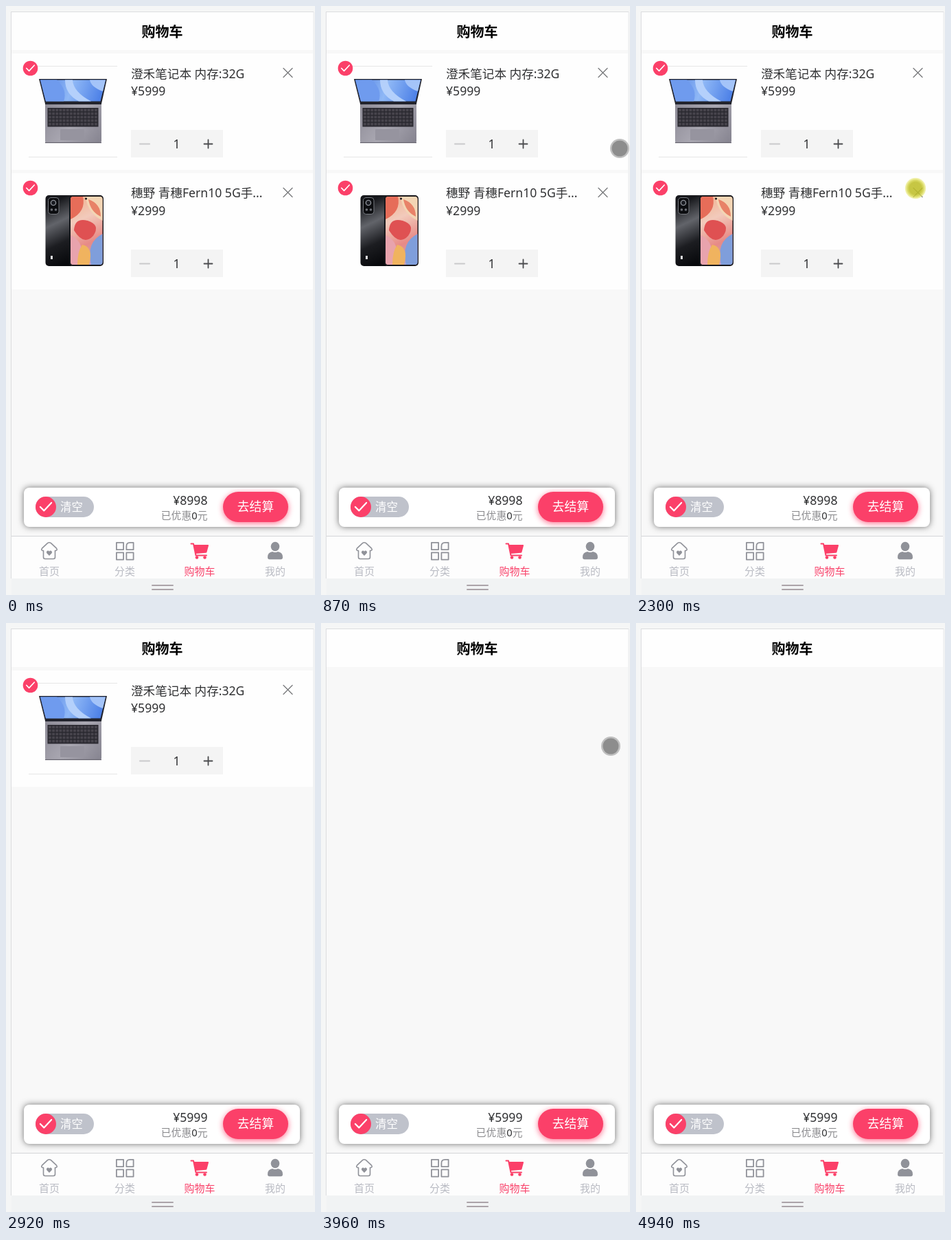
Animation of 450 by 856 pixels, one loop 5270 ms. Source, as an HTML page with a canvas:

```html
<!DOCTYPE html>
<html lang="zh-CN">
<head>
<meta charset="utf-8">
<title>购物车</title>
<style>
html, body { margin: 0; width: 100%; height: 100%; overflow: hidden; background: #f5f6f6; }
canvas, svg { position: absolute; left: 0; top: 0; width: 450px; height: 856px; }
text { font: 17.6px "Noto Sans", "Noto Sans CJK SC", "Noto Sans CJK", sans-serif; fill: #303133; }
.head { font-size: 20px; font-weight: bold; fill: #000; }
.mid { text-anchor: middle; }
.end { text-anchor: end; }
.white { fill: #fff; }
.small { font-size: 14.8px; fill: #8c8c8f; }
.tab { font-size: 15px; fill: #b9bbc3; text-anchor: middle; }
.on { fill: #f9436b; }
</style>
</head>
<body>
<canvas id="stage" width="450" height="856"></canvas>
<svg viewBox="0 0 450 856">
  <text class="head mid" x="227.5" y="44.5">购物车</text>
  <g id="laptop">
    <text x="182" y="104.5">澄禾笔记本 内存:32G</text>
    <text x="182" y="129.5">¥5999</text>
    <text class="mid" x="248.5" y="206.5">1</text>
  </g>
  <g id="phone">
    <text x="182" y="278">穗野 青穗Fern10 5G手...</text>
    <text x="182" y="303.5">¥2999</text>
    <text class="mid" x="248.5" y="380.5">1</text>
  </g>
  <text class="white" x="79" y="734.3" style="font-size:16.5px">清空</text>
  <text id="total" class="end" x="293.5" y="724.5">¥8998</text>
  <text class="small end" x="293.5" y="746">已优惠<tspan fill="#303133">0</tspan>元</text>
  <text class="white mid" x="363.5" y="734" style="font-size:17.8px">去结算</text>
  <text class="tab" x="63" y="827">首页</text>
  <text class="tab" x="173" y="827">分类</text>
  <text class="tab on" x="282" y="827">购物车</text>
  <text class="tab" x="392" y="827">我的</text>
</svg>
<script>
const LOOP = 5270, STEP = 68.6;
const PINK = '#fb4069', GREY = '#909299';
const PHONE_GONE = 2500, LAPTOP_GONE = 3830;
const $ = id => document.getElementById(id);
const c = $('stage').getContext('2d');

// Each path: points [time, x, y]; the pointer is hidden between "out" and the next path.
const paths = [
  { out: 2920, pts: [[460, 456, 789], [600, 452, 640], [740, 446, 380], [870, 435, 207], [940, 429, 176],
    [1010, 424, 145], [1150, 413, 108], [1280, 409, 106], [1410, 399, 145], [1480, 393, 179],
    [1550, 393, 228], [1690, 399, 252], [1970, 407, 265], [2710, 407, 265], [2780, 420, 238], [2850, 435, 204]] },
  { out: 4180, pts: [[3060, 449, 119], [3200, 433, 108], [3420, 418, 96], [3760, 418, 96],
    [3830, 418, 102], [3890, 419, 130], [3960, 422, 179], [4040, 432, 245], [4110, 444, 318]] },
  { out: 4870, pts: [[4380, 454, 734], [4590, 445, 790], [4800, 436, 858]] }
];
const clicks = [[2300, 2430], [3690, 3830]];

function rect(x, y, w, h, fill) {
  c.fillStyle = fill;
  c.fillRect(x, y, w, h);
}
function round(x, y, w, h, r, fill) {
  c.beginPath();
  c.roundRect(x, y, w, h, r);
  c.fillStyle = fill;
  c.fill();
}
function disc(x, y, r, fill) {
  c.beginPath();
  c.arc(x, y, r, 0, 7);
  c.fillStyle = fill;
  c.fill();
}
function shape(d, fill) {
  c.fillStyle = fill;
  c.fill(new Path2D(d));
}
function line(d, color, width) {
  c.strokeStyle = color;
  c.lineWidth = width;
  c.stroke(new Path2D(d));
}
function blend(x0, y0, x1, y1, ...colors) {
  const g = c.createLinearGradient(x0, y0, x1, y1);
  colors.forEach((k, i) => g.addColorStop(i / (colors.length - 1), k));
  return g;
}
function glow(color, blur, dy, draw) {
  c.save();
  c.shadowColor = color;
  c.shadowBlur = blur;
  c.shadowOffsetY = dy;
  draw();
  c.restore();
}
function tick(x, y, s, width) {
  line(`M${x - 6 * s} ${y}L${x - 2 * s} ${y + 4 * s}L${x + 6 * s} ${y - 4.5 * s}`, '#fff', width);
}

function row(y, picture) {
  rect(8, y, 439, 169, '#fefefe');
  picture();
  disc(35.5, y + 21.5, 10.8, PINK);
  tick(35.5, y + 21.5, 0.95, 1.7);
  line(`M404 ${y + 21.5}l13 13m0-13l-13 13`, '#77787b', 1.3);
  rect(182, y + 111, 134, 40, '#f4f4f4');
  line(`M195 ${y + 131.5}h14`, '#c9c9cb', 2);
  line(`M288.5 ${y + 131.5}h12m-6-6v12`, '#4a4b4e', 1.8);
}

function laptop() {
  rect(33, 87, 129, 1, '#e6e6e6');
  rect(33, 219, 129, 1, '#e6e6e6');
  shape('M48 106H147L139 142H57Z', '#20222c');
  shape('M50 107.5H145L137.5 138.5H58Z', blend(50, 107, 138, 139, '#4f7de0', '#8fb8f6', '#4a7ee6'));
  shape('M50 107.5H74Q90 122 84 138.5H58Z', '#6f9bee');
  shape('M97 107.5Q98 125 124 138.5H106Q86 128 86 107.5Z', '#b4d0fb');
  shape('M122 107.5Q124 118 141 124L145 107.5Z', '#a4c4f9');
  shape('M57 141H139V196Q139 199 136 199H59Q57 199 57 196Z', blend(57, 142, 139, 199, '#8d8b96', '#a9a7b1', '#85838f'));
  rect(57, 139, 82, 4, '#22232c');
  rect(60.5, 148, 74, 27.5, '#2a2930');
  for (let i = 0; i < 5; i++)
    for (let k = 0; k < 14; k++) rect(62 + k * 5.15, 149.5 + i * 5.1, 3.9, 3.6, '#47444c');
  round(79, 179, 35, 16, 1, '#96949f');
  rect(57, 198, 82, 1.2, '#5f5d68');
}

function phone() {
  round(57.5, 275, 42, 103, 5, blend(58, 290, 96, 370, '#17181c', '#62646a', '#1c1d21', '#08090c'));
  round(61.5, 278.5, 15.5, 24, 4, '#0c0d10');
  c.lineWidth = 1;
  c.strokeStyle = '#777a80';
  c.stroke();
  disc(69, 286, 4.3, '#8c9097');
  disc(69, 286, 2.9, '#181a20');
  disc(66.5, 296, 1.8, '#6e7178');
  disc(72.5, 296, 1.8, '#6e7178');
  rect(65, 363, 3, 5, '#dedee0');
  round(92, 275, 50, 103, 5, '#17171b');
  c.save();
  c.beginPath();
  c.roundRect(94, 277, 46.5, 99, 4);
  c.clip();
  rect(94, 277, 47, 99, blend(94, 277, 140, 376, '#efb08c', '#f2cabb', '#e78a86', '#b9a6d4'));
  shape('M94 277H112Q117 299 94 310Z', '#e66d59');
  shape('M116 277H141V312Q119 302 116 277Z', '#f3d5b4');
  shape('M120 281Q138 287 138 306Q123 299 120 281Z', '#e88268');
  shape('M99 326Q100 307 119 312Q138 318 127 334Q113 349 99 326Z', '#df5152');
  shape('M94 333Q117 343 108 376H94Z', '#e8a3ad');
  shape('M141 331Q116 343 124 376H141Z', '#7f9edb');
  shape('M111 347Q128 350 121 376H104Q104 357 111 347Z', '#f0b35f');
  c.restore();
  disc(116.5, 280, 1.5, '#17171b');
}

function checkout() {
  glow('rgba(0,0,0,.55)', 10, 0, () => round(26, 700, 402, 57, 8, '#fff'));
  round(43, 713, 85, 30, 15, '#bfc2cb');
  disc(58, 728, 15, PINK);
  tick(58, 728, 1.35, 2.2);
  glow('rgba(251,64,105,.75)', 8, 2, () => round(316, 706, 95, 44, 22, PINK));
}

function tabs() {
  rect(8, 770, 439, 62, '#fdfdfd');
  rect(8, 770, 439, 1, '#d4d5d8');
  line('M60.5 780.7Q63 778.7 65.500 780.7L73.500 788.2Q75.500 790.5 72.500 791.500H71.500V801Q71.500 803.5 69 803.5H57Q54.500 803.5 54.500 801V791.500H53.500Q50.500 790.5 52.500 788.2Z', GREY, 1.6);
  shape('M63 799L59.400 795.3Q58.200 793.5 59.600 792.200Q61.500 790.8 63 792.800Q64.500 790.8 66.400 792.200Q67.800 793.5 66.600 795.3Z', GREY);
  line('M160.900 779.900H171.100V790.100H160.900ZM160.900 794.400H171.100V804.600H160.900ZM175.400 794.400H185.600V804.600H175.400ZM185.600 779.900V790.100H175.400V785Q175.400 779.900 180.500 779.900Z', GREY, 1.8);
  line('M269.500 781.500H273L276.500 798.500H292', PINK, 2);
  shape('M273.500 783H294.200Q295.300 783 295 784.200L292.500 793.500Q292.200 794.700 291 794.800L276 796Z', PINK);
  disc(278, 801.500, 2.300, PINK);
  disc(289.500, 801.500, 2.300, PINK);
  c.beginPath();
  c.ellipse(392, 785.500, 6.300, 6.800, 0, 0, 7);
  c.fillStyle = GREY;
  c.fill();
  shape('M381 801Q381 794 388 793Q392 795 396 793Q403 794 403 801Q403 804.200 400 804.200H384Q381 804.200 381 801Z', GREY);
}

function pointer(t) {
  const path = paths.find(p => t >= p.pts[0][0] && t < p.out);
  if (!path) return;
  const i = path.pts.findLastIndex(p => t >= p[0]);
  const a = path.pts[i], b = path.pts[i + 1] || a;
  const gone = Math.floor((t - a[0]) / STEP + 0.02) * STEP;
  const k = b === a ? 0 : Math.min(1, gone / (b[0] - a[0]));
  const x = a[1] + (b[1] - a[1]) * k, y = a[2] + (b[2] - a[2]) * k;
  if (clicks.some(([from, to]) => t >= from && t < to)) {
    const g = c.createRadialGradient(x, y, 9, x, y, 15.500);
    g.addColorStop(0, 'rgba(190,190,40,.87)');
    g.addColorStop(0.45, 'rgba(212,212,70,.82)');
    g.addColorStop(1, 'rgba(238,238,130,.5)');
    disc(x, y, 15.200, g);
  } else {
    disc(x, y, 14, '#bfbfbf');
    disc(x, y, 11.500, '#8d8d8d');
  }
}

function draw(t) {
  const hasLaptop = t < LAPTOP_GONE, hasPhone = t < PHONE_GONE;
  c.lineCap = 'round';
  c.lineJoin = 'round';
  rect(0, 0, 450, 856, '#f5f6f6');
  rect(7, 8, 441, 824, '#dcdddf');
  rect(8, 9, 439, 823, '#f8f8f8');
  rect(447, 9, 3, 823, '#f1f2f3');
  rect(8, 9, 439, 55, '#fefefe');
  if (hasLaptop) row(69, laptop);
  if (hasPhone) row(243, phone);
  checkout();
  tabs();
  rect(8, 832, 442, 24, t >= 4660 && t < 4870 ? '#e6e8eb' : '#f1f3f4');
  round(212, 841, 32, 2, 1, '#aba3a9');
  round(212, 847, 32, 2, 1, '#aba3a9');
  pointer(t);
  $('laptop').style.display = hasLaptop ? '' : 'none';
  $('phone').style.display = hasPhone ? '' : 'none';
  $('total').textContent = hasPhone ? '¥8998' : '¥5999';
}

const start = performance.now();
function frame() {
  draw((performance.now() - start) % LOOP);
  requestAnimationFrame(frame);
}
frame();
</script>
</body>
</html>
```
